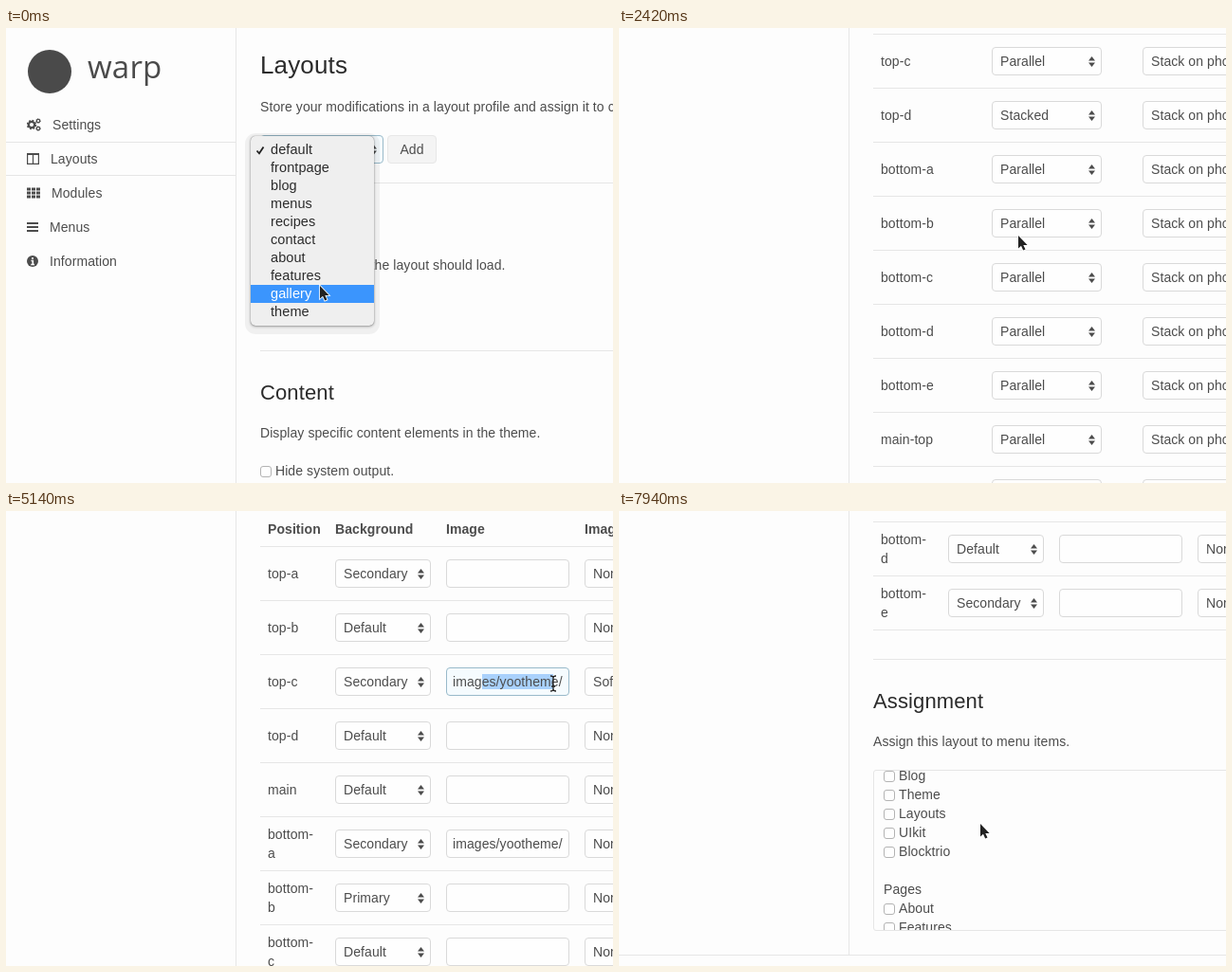
Animation of 640x480 px, one loop 8000 ms. Source, as an HTML page:

```html
<!DOCTYPE html>
<html lang="en">
<head>
<meta charset="utf-8">
<title>Layout settings</title>
<style>
html, body { margin: 0; width: 100%; height: 100%; overflow: hidden; background: #fdfdfd; }
* { box-sizing: border-box; letter-spacing: .0055em; }
#stage { position: relative; width: 640px; height: 480px; overflow: hidden; font: 14px/20px "Liberation Sans", Arial, sans-serif; color: #4c4c4c; }
#stage div, #stage svg { position: absolute; }
#page { left: 0; top: 0; width: 640px; height: 3100px; }
.text { white-space: pre; }
.h1, .h2, .h3 { margin-top: 1px; color: #2b2b2b; }
.h1 { font-size: 26px; }
.h2 { font-size: 22px; }
.h3 { font-size: 18px; }
.bold { font-weight: bold; }
.brand { font: 33px/20px "Open Sans", sans-serif; color: #4a4a4a; }
.dot { border-radius: 50%; background: #4a4a4a; }
.line { background: #e6e6e6; }
.field { border: 1px solid #d9d9d9; border-radius: 4px; background: #fefefe; }
.field .text { top: 4px; }
.focus { border-color: #99baca; background: #f5fbfe; }
.arrows { right: 6px; top: 9px; width: 7px; height: 11px; background: #4c4c4c;
  clip-path: polygon(50% 0, 100% 42%, 0 42%, 0 58%, 100% 58%, 50% 100%, 0 58%, 0 42%); }
.button { border: 1px solid #e7e7e7; border-radius: 4px; background: #f4f4f4; line-height: 28px; text-align: center; }
.selection { left: 37px; top: 6px; height: 16px; background: #a9d1fc; }
.check { border: 1px solid #b3b3b3; border-radius: 3px; background: #fefefe; }
.check svg { display: none; left: 0; top: 0; }
.check.on { border-color: #3388f2; background: #3d93fb; }
.check.on svg { display: block; }
.popup { border-radius: 5px; background: #efefef; color: #2c2c2c; font-size: 14.5px;
  box-shadow: 0 0 1px rgba(0,0,0,.5), 0 1px 3px rgba(0,0,0,.35), 0 3px 0 6px rgba(0,0,0,.05); }
.option { width: 100%; height: 19px; line-height: 19px; padding-left: 21px; white-space: pre; }
.option.hover { background: #3b95fd; color: #fff; }
.option svg { left: 5px; top: 5px; }
.list { border: 1px solid #e6e6e6; border-radius: 3px; overflow: hidden; }
</style>
</head>
<body>
<div id="stage">
  <div id="page"></div>
  <svg id="arrow" width="16" height="22" viewBox="-2 -2 16 22">
    <path d="M0 0V13.5L3 10.7L5.2 15.6L7.5 14.6L5.3 9.9H9.6Z" fill="#222" stroke="#fff" stroke-width="1.6" paint-order="stroke"/>
  </svg>
  <svg id="beam" width="12" height="18" viewBox="-6 -9 12 18">
    <path d="M-3 -8Q0 -8 0 -6Q0 -8 3 -8M0 -6V6M-3 8Q0 8 0 6Q0 8 3 8M-2 3H2" fill="none" stroke="#222" stroke-width="1.3"/>
  </svg>
</div>
<script>
const $ = id => document.getElementById(id);
const page = $('page');

function add(cls, x, y, w, h, content = '', parent = page) {
  const el = document.createElement('div');
  el.className = cls;
  if (x != null) el.style.left = x + 'px';
  if (y != null) el.style.top = y + 'px';
  if (w) el.style.width = w + 'px';
  if (h) el.style.height = h + 'px';
  el.innerHTML = content;
  parent.append(el);
  return el;
}

const tick = color => `<svg width="10" height="10" viewBox="0 0 10 10"><path d="M1.5 5.5L4 8.3L8.5 1.5" fill="none" stroke="${color}" stroke-width="1.8"/></svg>`;
const text = (x, mid, content, cls = '', parent) => add('text ' + cls, x, mid - 10, 0, 0, content, parent);
const rule = (y, x = 268, w = 372) => add('line', x, y, w, 1);

function field(x, mid, w, value, pad = 8) {
  const el = add('field', x, mid - 15, w, 30);
  el.label = add('text', pad, null, 0, 0, value, el);
  return el;
}

function select(x, mid, w, value) {
  const el = field(x, mid, w, value);
  add('arrows', null, null, 0, 0, '', el);
  return el;
}

const button = (x, w, label) => add('button', x, 113, w, 30, label);

function checkbox(x, mid, label, on, parent) {
  text(x + 16, mid, label, '', parent);
  return add('check' + (on ? ' on' : ''), x, mid - 5, 12, 12, tick('#fff'), parent);
}

function section(lineY, title, intro) {
  rule(lineY);
  text(268, lineY + 44, title, 'h2');
  text(268, lineY + 87, intro);
}

function tableHead(mid, titles) {
  titles.forEach(([x, title]) => text(x, mid, title, 'bold'));
  rule(mid + 18);
}

function popup(x, y, w, options, checked) {
  const el = add('popup', x, y, w, options.length * 19 + 10);
  el.options = options.map((name, i) => add('option', 0, 5 + 19 * i, 0, 0, (i === checked ? tick('#222') : '') + name, el));
  el.box = { x, y, w };
  return el;
}

function showPopup(el, open, x, y) {
  el.style.display = open ? '' : 'none';
  const { box } = el;
  const inside = x >= box.x && x < box.x + box.w;
  const hovered = inside ? Math.floor((y - box.y - 5) / 19) : -1;
  el.options.forEach((option, i) => option.classList.toggle('hover', i === hovered));
}

// Sidebar
add('line', 242, 0, 1, 2959);
add('dot', 23, 23, 46, 46);
text(86, 41, 'warp', 'brand');
rule(120, 0, 242);
rule(155, 0, 242);
const gear = (x, y, r) => `<circle cx="${x}" cy="${y}" r="${r}" stroke-width="${r * .7}"/><circle cx="${x}" cy="${y}" r="${r * 1.4}" stroke-width="${r * .5}" stroke-dasharray="${r * .55}"/>`;
const cell = (x, y) => `<path d="M${x} ${y}h4" stroke-width="3"/>`;
const icons = [
  gear(5, 7, 3.2) + gear(12, 3, 1.7) + gear(12, 11, 1.7),
  '<path d="M.6 1.5H12.4V12.4H.6ZM6.5 1V13" stroke-width="1.2"/><path d="M0 2H13" stroke-width="2"/>',
  [0, 5, 10].map(x => [3, 7, 11].map(y => cell(x, y)).join('')).join(''),
  '<path d="M0 3H12M0 7H12M0 11H12" stroke-width="2"/>',
  '<circle cx="6" cy="7" r="6" fill="#4c4c4c" stroke="none"/><path d="M6 3V5M4.5 6.5H6.3V10.5M4.3 10.5H8" stroke="#fff" stroke-width="1.6"/>'
];
[[49, 'Settings'], [47, 'Layouts'], [48, 'Modules'], [46, 'Menus'], [46, 'Information']].forEach(([x, label], i) => {
  const mid = 102 + 36 * i;
  text(x, mid, label);
  add('', 22, mid - 7, 16, 14, `<svg width="16" height="14" fill="none" stroke="#4c4c4c">${icons[i]}</svg>`);
});

// Layout profile
text(268, 38, 'Layouts', 'h1');
text(268, 83, 'Store your modifications in a layout profile and assign it to content pages.');
const profile = select(268, 128, 130, 'default');
profile.classList.add('focus');
button(402, 52, 'Add');
const extraButtons = [button(457, 78, 'Rename'), button(539, 78, 'Remove')];

section(163, 'Style', 'Select which style the layout should load.');
select(268, 295, 105, 'default');

section(340, 'Content', 'Display specific content elements in the theme.');
const hideOutput = checkbox(268, 467, 'Hide system output.');
checkbox(268, 492, 'Display the to-top scroller.', true);

// Sidebars and grid
const gridHead = [[276, 'Position'], [393, 'Layout'], [552, 'Responsive']];
function gridRow(mid, name, value) {
  text(276, mid, name);
  select(393, mid, 116, value);
  select(552, mid, 140, 'Stack on phones');
  rule(mid + 28);
}

section(530, 'Sidebars', 'Choose the width of each sidebar.');
tableHead(685, gridHead);
['sidebar-a', 'sidebar-b'].forEach((name, i) => gridRow(732 + 57 * i, name, '25%'));

section(840, 'Grid', 'Choose the grid layout of each position.');
tableHead(995, gridHead);
['top-a', 'top-b', 'top-c', 'top-d', 'bottom-a', 'bottom-b', 'bottom-c', 'bottom-d', 'bottom-e', 'main-top', 'main-bottom']
  .forEach((name, i) => gridRow(1042 + 57 * i, name, name === 'top-d' ? 'Stacked' : 'Parallel'));

// Navigation
section(1671, 'Navigation', 'Pick the sticky mode of the menu navbar.');
select(268, 1802, 180, 'Transparent and sticky');
checkbox(268, 1833, 'Center the logo and navbar and display the logo above the navbar.', true);

// Block appearance
section(1873, 'Block Appearance', 'Choose the appearance settings for each block position. (Image paths are relative)');
tableHead(2028, [[276, 'Position'], [347, 'Background'], [464, 'Image'], [610, 'Image Effect']]);
const imagePath = 'images/yootheme/';
let imageField;
[['top-a', 'Secondary'], ['top-b', 'Default'], ['top-c', 'Secondary', imagePath, 'Soft'], ['top-d', 'Default'], ['main', 'Default'],
 ['bottom-\na', 'Secondary', imagePath], ['bottom-\nb', 'Primary'], ['bottom-\nc', 'Default'], ['bottom-\nd', 'Default'], ['bottom-\ne', 'Secondary']
].forEach(([name, background, image = '', effect = 'None'], i) => {
  const mid = 2075 + 57 * i;
  text(276, name.includes('\n') ? mid - 10 : mid, name);
  select(347, mid, 101, background);
  const input = field(464, mid, 130, image, 6);
  if (name === 'top-c') imageField = input;
  select(610, mid, 101, effect);
  rule(mid + 28);
});
const selection = add('selection', null, null, 0, 0, '', imageField);
imageField.prepend(selection);

// Assignment
section(2647, 'Assignment', 'Assign this layout to menu items.');
const list = add('list', 268, 2764, 420, 170);
const items = add('', 0, 0, 400, 400, '', list);
text(10, 22, 'Blog Dynamic', 'h3', items);
checkbox(10, 64, 'Blog Dynamic', false, items);
text(10, 116, 'Main Menu', 'h3', items);
['Home', 'Blog', 'Theme', 'Layouts', 'UIkit', 'Blocktrio', '', 'Pages', 'About', 'Features', 'Gallery'].forEach((name, i) => {
  const mid = 158 + 20 * i;
  if (name === 'Pages') text(10, mid, name, '', items);
  else if (name) checkbox(10, mid, name, name === 'Home', items);
});
rule(2959, 0, 640);

const profileMenu = popup(258, 114, 130,
  ['default', 'frontpage', 'blog', 'menus', 'recipes', 'contact', 'about', 'features', 'gallery', 'theme'], 0);
const stickyMenu = popup(258, 1750, 191, ['Not sticky', 'Always sticky', 'Transparent and sticky'], 2);
const backgroundMenu = popup(337, 2117, 102, ['Default', 'Muted', 'Primary', 'Secondary'], 3);

// Motion: [time, ...values]
const scrollPath = [[1300, 0], [1460, 120], [2180, 860], [2420, 1121], [2740, 1480], [3060, 1672], [4060, 1672],
  [4340, 1900], [4580, 1980], [4820, 2009], [6580, 2009], [6820, 2480], [6900, 2500], [7140, 2493], [7300, 2491]];
const listPath = [[7460, 0], [7940, 173]];
const pointerPath = [[500, 331, 271], [900, 325, 149], [980, 325, 149], [1140, 360, 153], [1300, 360, 153], [1460, 421, 218],
  [2820, 421, 218], [3060, 400, 135], [3300, 400, 130], [3540, 380, 98], [3700, 390, 112], [3940, 489, 150],
  [4900, 489, 150], [5060, 503, 182], [5140, 577, 182], [5220, 594, 183], [5460, 400, 180], [5700, 390, 172],
  [5860, 385, 178], [6220, 237, 206], [6580, 443, 184], [7060, 443, 184], [7380, 381, 329]];

function along(path, t) {
  const next = path.findIndex(point => point[0] > t);
  if (next === 0) return path[0].slice(1);
  if (next < 0) return path[path.length - 1].slice(1);
  const a = path[next - 1], b = path[next];
  const k = (t - a[0]) / (b[0] - a[0]);
  return a.slice(1).map((v, i) => Math.round(v + (b[i + 1] - v) * k));
}

const move = (el, x, y) => el.style.transform = `translate(${x}px, ${y}px)`;
const within = (t, from, to) => t >= from && t < to;

function render(t) {
  const [scroll] = along(scrollPath, t);
  const [x, y] = along(pointerPath, t);
  move(page, 0, -scroll);
  move(items, 0, -along(listPath, t)[0]);

  showPopup(profileMenu, t < 980, x, y + scroll);
  showPopup(stickyMenu, within(t, 3300, 4020), x, y + scroll);
  showPopup(backgroundMenu, within(t, 5460, 5860), x, y + scroll);

  const loaded = t >= 1060;
  profile.label.textContent = t < 980 ? 'default' : 'frontpage';
  extraButtons.forEach(el => el.style.display = loaded ? '' : 'none');
  hideOutput.classList.toggle('on', loaded);

  const editing = within(t, 5060, 5860);
  imageField.classList.toggle('focus', editing);
  const selectedTo = t < 5220 ? x - 502 : 85;
  selection.style.width = (editing ? selectedTo : 0) + 'px';

  const typing = within(t, 5060, 5380);
  $('arrow').style.display = typing ? 'none' : '';
  $('beam').style.display = typing ? '' : 'none';
  move($('arrow'), x - 2, y - 1);
  move($('beam'), x - 6, y - 9);
}

const start = performance.now();
function loop() {
  const t = (performance.now() - start) % 8000;
  render(t < 500 ? 0 : 500 + 80 * Math.floor((t - 500) / 80));
  requestAnimationFrame(loop);
}
loop();
</script>
</body>
</html>
```
